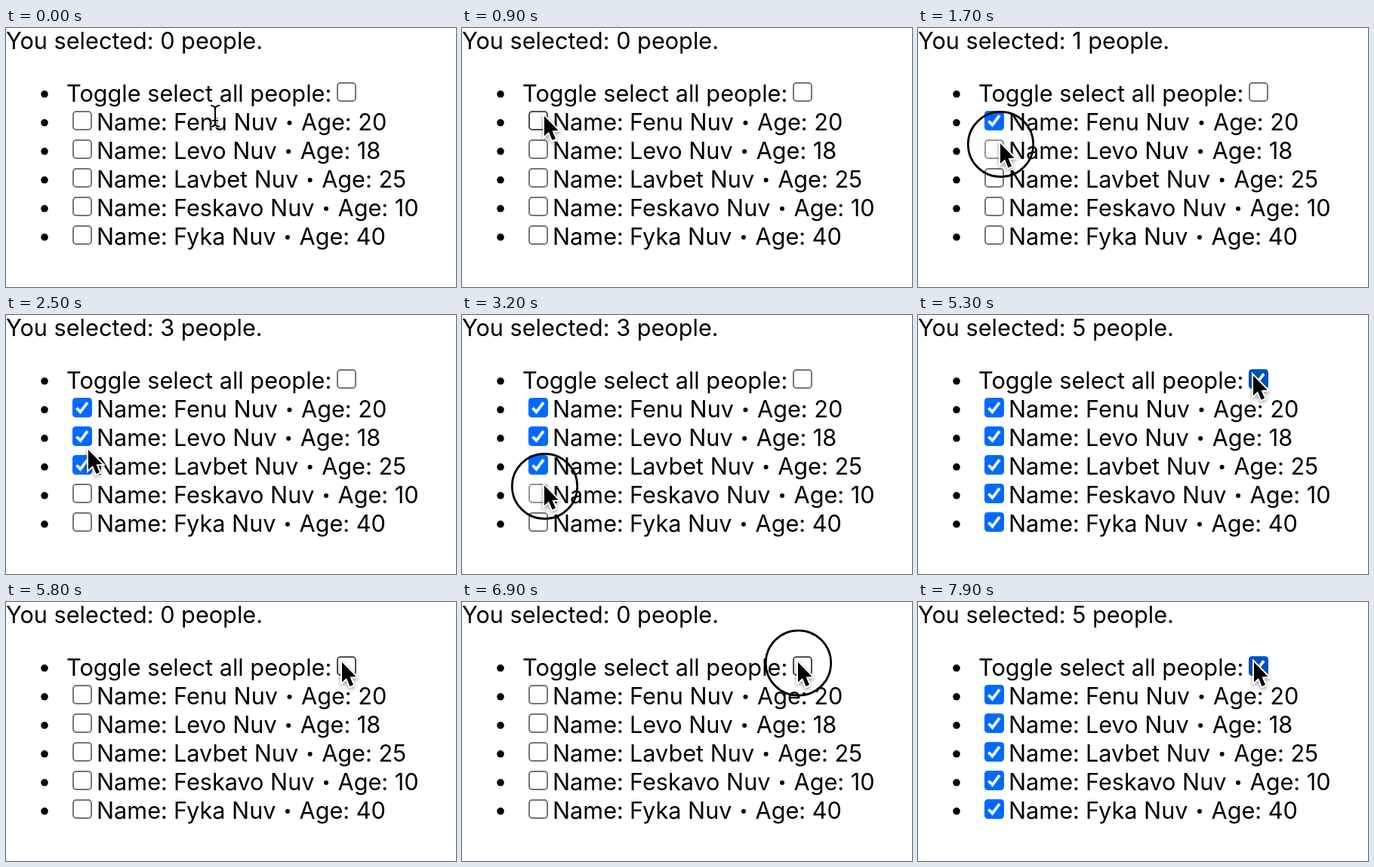
An HTML page with a canvas for the animation above (8000 ms loop, 596 px wide and 344 px high).

```html
<!DOCTYPE html>
<html lang="en">
<head>
<meta charset="utf-8">
<title>Select people</title>
<style>
  html, body { margin: 0; width: 100%; height: 100%; overflow: hidden; background: #fff; }
  canvas { display: block; }
</style>
</head>
<body>
<canvas id="stage" width="596" height="344"></canvas>
<script>
const ctx = document.getElementById('stage').getContext('2d');
const LOOP = 8000;
const ROW = 38;
const BOX = 26;
const BEAM_UNTIL = 230;
const TRAVEL = 700;
const PRESS = 200;

const people = [
  { name: 'Fenu Nuv', age: 20 },
  { name: 'Levo Nuv', age: 18 },
  { name: 'Lavbet Nuv', age: 25 },
  { name: 'Feskavo Nuv', age: 10 },
  { name: 'Fyka Nuv', age: 40 }
];

// Where the pointer goes and when it presses; row 0 is the toggle for all.
const stops = [
  { row: 1, arrive: 800, press: 1000 },
  { row: 2, arrive: 1400, press: 1600 },
  { row: 3, arrive: 2000, press: 2200 },
  { row: 2.7, arrive: 2500 },
  { row: 4, arrive: 2900, press: 3100 },
  { row: 5, arrive: 3500, press: 3600, quick: true },
  { row: 0, arrive: 5400, press: 5600 },
  { row: 0, arrive: 6800, press: 6900 }
];

const easeOut = u => 1 - (1 - u) ** 3;
const clamp = u => Math.min(1, Math.max(0, u));
const release = stop => stop.press + PRESS;
const place = row => row === 0 ? { x: 445, y: 80 } : { x: 109, y: 117 + 36.5 * (row - 1) };

function countAt(t) {
  let count = 0;
  for (const stop of stops) {
    if (!stop.press || t < release(stop)) continue;
    count = stop.row || (count === people.length ? 0 : people.length);
  }
  return count;
}

function pointerAt(t) {
  if (t < BEAM_UNTIL) return { x: 277, y: 117, beam: true };
  const step = Math.floor(t / 100) * 100;
  let pos = { x: 226, y: 102 };
  let free = 300;
  for (const stop of stops) {
    const leave = Math.max(free, stop.arrive - TRAVEL);
    const u = easeOut(clamp((step - leave) / (stop.arrive - leave)));
    const goal = place(stop.row);
    pos = { x: pos.x + (goal.x - pos.x) * u, y: pos.y + (goal.y - pos.y) * u };
    free = stop.press ? release(stop) : stop.arrive;
  }
  const click = stops.find(s => s.press && t >= s.press && t < release(s));
  return {
    ...pos,
    ring: click && !click.quick,
    pressed: click && t >= click.press + PRESS / 2
  };
}

function polyline(points, close) {
  ctx.beginPath();
  points.forEach(([x, y]) => ctx.lineTo(x, y));
  if (close) ctx.closePath();
}

function dot(x, y, r) {
  ctx.beginPath();
  ctx.arc(x, y, r, 0, 2 * Math.PI);
  ctx.fill();
}

function checkbox(x, row, checked, p) {
  const y = 72 + ROW * row;
  const hover = !p.beam && p.x >= x && p.x <= x + BOX && p.y >= y && p.y <= y + BOX;
  const pick = (normal, over, down) => !hover ? normal : p.pressed ? down : over;
  ctx.save();
  ctx.translate(x, y);
  ctx.beginPath();
  if (checked) {
    ctx.roundRect(0, 0, BOX, BOX, 4.5);
    ctx.fillStyle = pick('#006aff', '#0052bd', '#3789ff');
    ctx.fill();
    polyline([[5.5, 13.5], [10.5, 18.8], [20, 6.2]]);
    ctx.strokeStyle = '#fff';
    ctx.lineWidth = 3.8;
  } else {
    ctx.roundRect(1, 1, BOX - 2, BOX - 2, 4);
    ctx.strokeStyle = pick('#767676', '#4f4f4f', '#979797');
    ctx.lineWidth = 2;
  }
  ctx.stroke();
  ctx.restore();
}

function arrow() {
  polyline([[0, 0], [0, 26.5], [6, 21], [10.5, 32], [15, 30], [10.5, 19.5], [18.5, 19]], true);
  ctx.lineWidth = 4;
  ctx.strokeStyle = '#fff';
  ctx.shadowColor = 'rgba(0,0,0,.4)';
  ctx.shadowBlur = 5;
  ctx.shadowOffsetY = 2;
  ctx.stroke();
  ctx.shadowColor = 'transparent';
  ctx.fillStyle = '#000';
  ctx.fill();
}

function beam() {
  ctx.beginPath();
  for (const side of [-1, 1]) {
    ctx.moveTo(-6, 14 * side);
    ctx.quadraticCurveTo(0, 14 * side, 0, 9 * side);
    ctx.quadraticCurveTo(0, 14 * side, 6, 14 * side);
  }
  ctx.moveTo(0, -10);
  ctx.lineTo(0, 10);
  ctx.moveTo(-4, 6);
  ctx.lineTo(4, 6);
  for (const [color, width] of [['#fff', 4], ['#000', 2]]) {
    ctx.strokeStyle = color;
    ctx.lineWidth = width;
    ctx.stroke();
  }
}

function pointer(p) {
  ctx.save();
  ctx.translate(p.x, p.y);
  if (p.ring) {
    ctx.beginPath();
    ctx.arc(0.5, 1, 43.2, 0, 2 * Math.PI);
    ctx.strokeStyle = '#000';
    ctx.lineWidth = 2.7;
    ctx.stroke();
  }
  (p.beam ? beam : arrow)();
  ctx.restore();
}

function personRow({ name, age }, base) {
  const nameX = 222;
  const gap = 31;
  const nameEnd = nameX + ctx.measureText(name).width;
  ctx.fillText('Name:', 120, base);
  ctx.fillText(name, nameX, base);
  dot(nameEnd + gap / 2, base - 10, 3);
  ctx.fillText(`Age: ${age}`, nameEnd + gap, base);
}

function draw(t) {
  const count = countAt(t);
  const p = pointerAt(t);
  ctx.fillStyle = '#fff';
  ctx.fillRect(0, 0, 596, 344);

  ctx.font = '30.65px Inter, "Liberation Sans", sans-serif';
  ctx.fillStyle = '#000';
  ctx.fillText(`You selected: ${count} people.`, 0, 28);
  ctx.fillText('Toggle select all people:', 80, 98);
  for (let row = 0; row <= people.length; row++) {
    const base = 98 + ROW * row;
    ctx.fillStyle = '#000';
    dot(51, base - 10.2, 4.8);
    if (row) personRow(people[row - 1], base);
    checkbox(row ? 88 : 438, row, row ? row <= count : count === people.length, p);
  }
  pointer(p);
}

function tick() {
  draw(performance.now() % LOOP);
  requestAnimationFrame(tick);
}
tick();
</script>
</body>
</html>
```
